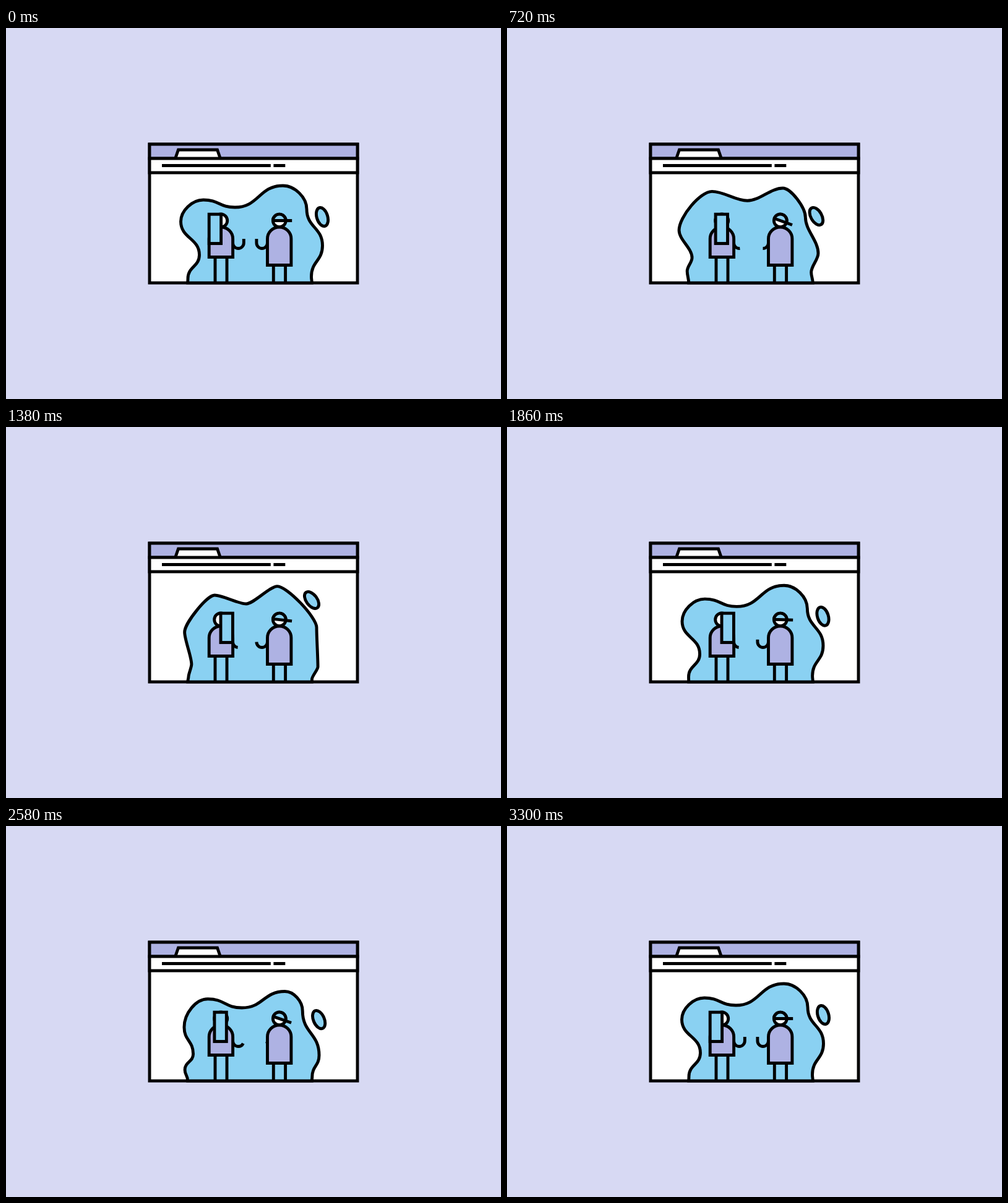
An HTML page for the animation above (3330 ms loop, 800 px wide and 600 px high).

```html
<!DOCTYPE html>
<html lang="en">
<head>
<meta charset="utf-8">
<title>Window conversation</title>
<style>
  html, body { margin: 0; width: 100%; height: 100%; overflow: hidden; background: #d7d9f3; }
  svg { display: block; width: 800px; height: 600px; }
  .ink { stroke: #000; stroke-width: 4.9; fill: none; }
  .white { fill: #fff; }
  .lilac { fill: #aeb2e3; }
  .blue { fill: #8ad1f2; }
</style>
</head>
<body>
<svg viewBox="0 0 800 600">
  <g class="ink">
    <rect class="white" x="232" y="188" width="336" height="224.2"/>
    <rect class="lilac" x="232" y="188" width="336" height="23"/>
    <path class="white" d="M274 210l4.5-13h63l4.5 13"/>
    <rect class="white" x="232" y="211" width="336" height="23"/>
    <path d="M252 222.5H427.8M432.4 222.5H451.3"/>
    <path id="blob" class="blue"/>
    <ellipse id="drop" class="blue" rx="8.8" ry="15.5"/>

    <path id="leftArm" pathLength="1" d="M366.5 347.5a8.9 9 0 0 0 17.8 0V341"/>
    <path d="M338 371V412M357 371V412"/>
    <circle class="white" cx="347.2" cy="311.5" r="10.5"/>
    <path class="lilac" d="M328.2 370.5V341a19.2 19 0 0 1 38.4 0V370.5Z"/>
    <rect id="tablet" class="blue" y="301.2" width="19.4" height="47.3"/>

    <path id="rightArm" pathLength="1" d="M422.5 347.5a8.8 9 0 0 1-17.6 0V341"/>
    <path d="M432.3 384V412M451.6 384V412"/>
    <circle class="white" cx="441.8" cy="311.5" r="10.4"/>
    <path id="cap" class="blue" d="M-10.4 0A10.4 10.4 0 0 1 10.4 0M-10.4 0H20.4"/>
    <path class="lilac" d="M422.5 383.5V341a19.2 19 0 0 1 38.4 0V383.5Z"/>
  </g>
</svg>
<script>
const LOOP = 3330, STEP = 30;
const $ = id => document.getElementById(id);

// Each pose: roundness, the blob's turning points clockwise from the lower left, drop centre
const wide = [.5, 294,405, 312.5,367, 282.5,313, 319,278, 370,290,
  447.5,255, 486,293, 511.5,352, 493.5,402, 511,305.5];
const leaning = [.4, 290.3,391, 300.3,367, 275.2,324, 328,263.5, 386.5,278.3,
  448.3,259, 476.5,299.5, 503.6,355.5, 491,392, 503,312.5];
const peaked = [.11, 295.5,403.5, 293,393, 292,342, 347,268.7, 398,283.8,
  433.6,259, 510.7,341, 500,407, 495,411, 484.8,266];
const low = [.5, 288.5,393, 301.4,369, 288.6,327, 327,280, 382.5,294.5,
  451,269, 478.5,300, 505.4,373, 495,406, 505,314];
const keys = [[0, wide], [570, leaning], [1140, peaked], [1740, wide],
  [2400, low], [3300, wide], [LOOP, wide]];

function ease(t, start, end) {
  const u = Math.min(1, Math.max(0, (t - start) / (end - start)));
  return u * u * (3 - 2 * u);
}

function poseAt(t) {
  const i = keys.findLastIndex(key => key[0] <= t);
  const [start, from] = keys[i], [end, to] = keys[i + 1];
  const u = ease(t, start, end);
  return from.map((v, k) => v + (to[k] - v) * u);
}

// Tangents lie flat on the upper edge (points 4 to 6) and upright on the sides
function outline(points, bend) {
  const handle = (i, j) => {
    const axis = i >= 4 && i <= 6 ? 0 : 1;
    return points[i].map((v, k) => k === axis ? v + bend * (points[j][k] - v) : v);
  };
  let d = `M${points[0]}`;
  for (let i = 1; i < points.length; i++)
    d += `C${handle(i - 1, i)} ${handle(i, i - 1)} ${points[i]}`;
  return d + 'Z';
}

const set = (id, name, value) => $(id).setAttribute(name, value);
const trim = (id, length) => set(id, 'stroke-dasharray', `${length} 2`);

function draw(t) {
  const [bend, ...flat] = poseAt(t);
  const points = [[293.7, 412.2]];
  for (let i = 0; i < flat.length; i += 2) points.push([flat[i], flat[i + 1]]);
  const [x, y] = points.pop();
  points.push([494.3, 412.2]);
  set('blob', 'd', outline(points, bend));
  set('drop', 'transform', `translate(${x} ${y}) rotate(${1.15 * (x - 511) - 17})`);

  const firstNod = ease(t, 0, 700) - ease(t, 800, 1740);
  const secondNod = ease(t, 1740, 2400) - ease(t, 2480, 3300);
  set('cap', 'transform', `translate(441.8 311.5) rotate(${20 * (firstNod + secondNod)})`);
  trim('rightArm', 1 - .59 * firstNod - .9 * secondNod);

  set('tablet', 'x', 328.2 + 18.8 * (ease(t, 160, 1320) - ease(t, 1940, 3160)));
  trim('leftArm', 1 - .62 * (ease(t, 100, 860) - ease(t, 1860, 3300)));
}

function tick() {
  const t = performance.now() % LOOP;
  draw(Math.floor(t / STEP) * STEP);
  requestAnimationFrame(tick);
}
tick();
</script>
</body>
</html>
```
